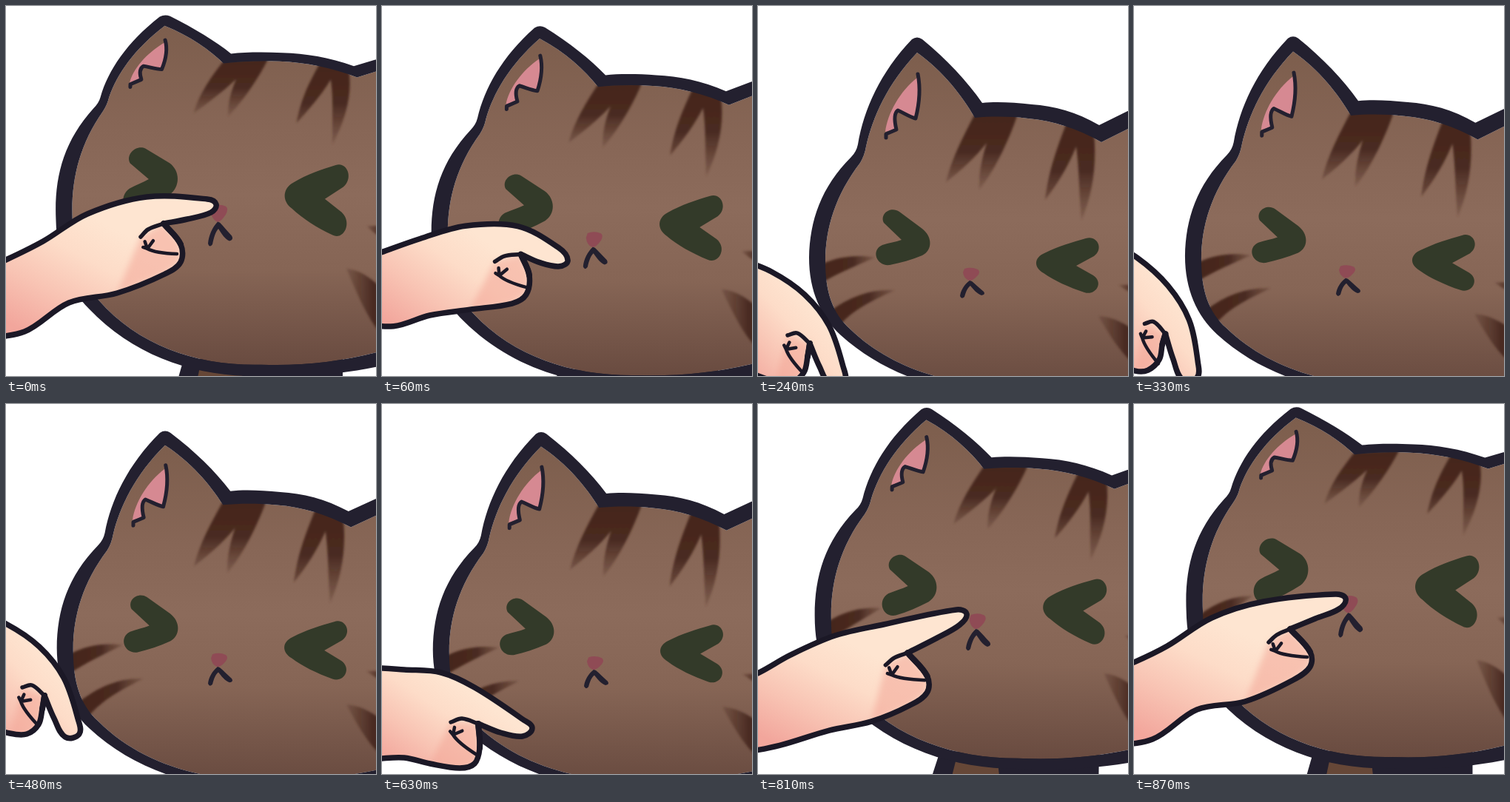
Write an HTML page that moves like this. It is 500 by 500 pixels and loops after 0.9 s.

```html
<!DOCTYPE html>
<html lang="en">
<head>
<meta charset="utf-8">
<title>Cat nose poke</title>
<style>
html, body { margin: 0; width: 100%; height: 100%; overflow: hidden; background: #fff; }
svg { display: block; width: 100vw; height: 100vh; }
</style>
</head>
<body>
<svg viewBox="0 0 500 500" xmlns="http://www.w3.org/2000/svg">
  <defs>
    <linearGradient id="fur" x1="0" y1="0" x2="0" y2="1">
      <stop offset="0" stop-color="#7d5e4d"/>
      <stop offset=".3" stop-color="#876656"/>
      <stop offset=".5" stop-color="#8c6b5b"/>
      <stop offset=".72" stop-color="#866555"/>
      <stop offset="1" stop-color="#694b40"/>
    </linearGradient>
    <linearGradient id="down" x1="0" y1="0" x2="0" y2="1">
      <stop offset="0" stop-color="#44251c"/>
      <stop offset=".5" stop-color="#4a2a20"/>
      <stop offset="1" stop-color="#5a392d" stop-opacity=".25"/>
    </linearGradient>
    <linearGradient id="right">
      <stop offset="0" stop-color="#44251c"/>
      <stop offset=".6" stop-color="#4a2a20"/>
      <stop offset="1" stop-color="#5a392d" stop-opacity=".35"/>
    </linearGradient>
    <linearGradient id="left" x1="1" x2="0">
      <stop offset="0" stop-color="#44251c"/>
      <stop offset=".4" stop-color="#4a2a20"/>
      <stop offset="1" stop-color="#5a392d" stop-opacity=".35"/>
    </linearGradient>
    <linearGradient id="skin" gradientUnits="userSpaceOnUse">
      <stop offset="0" stop-color="#fee5d1"/>
      <stop offset=".3" stop-color="#fddcc8"/>
      <stop offset=".65" stop-color="#f8c3b3"/>
      <stop offset="1" stop-color="#f2a69c"/>
    </linearGradient>
    <filter id="soft" x="-20%" y="-20%" width="140%" height="140%"><feGaussianBlur stdDeviation="1.6"/></filter>
    <filter id="softer" x="-30%" y="-30%" width="160%" height="160%"><feGaussianBlur stdDeviation="4"/></filter>
    <clipPath id="handClip"><path id="clipShape"/></clipPath>
  </defs>
  <rect width="500" height="500" fill="#fff"/>
  <g id="cat"></g>
  <g stroke="#1b1826" stroke-linecap="round" stroke-linejoin="round" fill="none">
    <path id="hand" fill="url(#skin)" stroke="none"/>
    <g clip-path="url(#handClip)" stroke="none"><path id="blush" fill="#f3a698" fill-opacity=".55" filter="url(#softer)"/></g>
    <path id="handLine" stroke-width="7.5"/>
    <path id="fist" stroke-width="8"/>
    <path id="crease" stroke-width="5.5"/>
    <path id="mark" stroke-width="4.5"/>
  </g>
</svg>
<script>
const $ = id => document.getElementById(id);
const LOOP = 900, STEP = 30, INK = '#23202f';

// ---- cat: paths in the lowered head pose, bent by the head pitch ----
const OUTER = 'M560 112L461 161C430 143 400 135 370 133C345 130 320 129 303 131C283 102 255 72 222 45' +
  'Q215 40 208 45C165 90 143 140 135 187Q133 197 126 204C85 245 70 290 69 340C69 385 85 420 112 445' +
  'C175 502 260 526 345 526C420 528 480 522 560 505Z';
const INNER = 'M560 136L464 184C432 166 400 155 365 152C340 149 315 149 293 151C275 120 250 88 215 63' +
  'C175 105 155 150 146 190Q144 202 138 212C105 255 91 300 91 345C91 385 100 415 125 437' +
  'C180 490 260 514 345 514C420 516 480 508 560 488Z';
const EAR = 'Q182 146 189 141C198 145 205 150 213 152C218 132 220 112 ';

const parts = [
  ['M240 506L226 545L455 545L455 506Z', INK],
  ['M262 515L254 545L322 545L318 515Z', '#664737'],
  [INNER, 'url(#fur)'],
  // forehead stripes
  ['M293 146C278 175 262 205 254 238C275 222 295 203 309 185C303 205 298 225 299 248C318 225 338 185 351 146Z', 'url(#down)', 'soft'],
  ['M418 155C405 190 393 220 388 262C405 240 420 215 430 190C434 220 434 255 437 290C452 255 458 215 454 172Z', 'url(#down)', 'soft'],
  // cheek stripes
  ['M86 349C110 338 135 336 158 340C135 350 110 360 88 373Z', 'url(#right)', 'soft'],
  ['M98 412C125 392 155 382 185 384C160 396 130 408 110 432Z', 'url(#right)', 'soft'],
  ['M487 377Q500 376 520 378L520 394Q500 387 487 377Z', 'url(#left)', 'soft'],
  ['M460 419C480 420 500 430 520 448L520 492C495 477 480 453 460 419Z', 'url(#left)', 'soft'],
  // ear
  ['M215 97C192 115 175 145 172 170L186 166' + EAR + '215 97Z', '#d68992'],
  ['M173 178L173 173Q180 170 187 167' + EAR + '216 92', 'none', '', 5],
  // eyes
  ['M170 293C164 280 180 270 191 278L222 301C236 312 236 330 222 337C207 343 193 347 178 350' +
   'C160 352 152 330 168 323C177 320 186 319 194 316Z', '#333a29'],
  ['M443 314C458 309 468 328 454 338L430 351L453 364C468 374 456 392 441 387C420 380 400 371 386 361' +
   'C372 353 373 340 387 334C405 325 425 319 443 314Z', '#333a29'],
  // nose and mouth
  ['M279 355Q288 352 297 356Q301 359 297 364Q290 372 285 371Q278 368 277 360Z', '#8f4b55'],
  ['M286 371C279 376 274 384 273 392Q275 397 279 393C281 386 283 381 287 378C291 383 296 389 302 391' +
   'Q308 390 305 386C299 381 294 376 289 372Z', INK],
  [OUTER + INNER, INK]
].map(([d, fill, blur, line]) => {
  const el = document.createElementNS('http://www.w3.org/2000/svg', 'path');
  el.setAttribute('fill', fill);
  el.setAttribute('fill-rule', 'evenodd');
  if (blur) el.setAttribute('filter', `url(#${blur})`);
  if (line) {
    el.setAttribute('stroke', INK);
    el.setAttribute('stroke-width', line);
    el.setAttribute('stroke-linecap', 'round');
    el.setAttribute('stroke-linejoin', 'round');
  }
  $('cat').append(el);
  return { el, d };
});

const bell = (v, mid, width) => Math.exp(-(((v - mid) / width) ** 2));

function bend(d, pitch) {
  return d.replace(/(\d+) (\d+)/g, (_, a, b) => {
    const x = +a, y = +b;
    const dome = 1 - 0.3 * ((Math.min(x, 480) - 400) / 270) ** 2;
    const nx = x + pitch * (x - 270) * 0.055 * bell(y, 200, 100);
    const ny = y - pitch * 104 * dome * bell(y, 270, 218);
    return nx.toFixed(2) + ' ' + ny.toFixed(2);
  });
}

// ---- hand poses: 17 outline points, then crease end, crease middle, mark start, mark end ----
const touch = [-40,360, 0,343, 50,318, 110,281, 190,258, 272,261, 284,268, 277,279, 245,288, 213,294, 236,322,
  236,346, 215,362, 150,388, 85,401, 25,440, -40,450, 182,312, 192,302, 191,328, 231,335];
const press = [-40,364, 0,349, 45,327, 105,289, 175,267, 272,257, 286,263, 277,277, 245,290, 211,304, 238,335,
  238,355, 215,373, 150,402, 85,413, 25,453, -40,462, 182,322, 193,312, 191,334, 234,342];
const reach = [-40,390, 0,372, 45,347, 105,337, 170,333, 255,320, 267,327, 258,340, 228,357, 186,373, 206,403,
  205,430, 183,444, 145,453, 100,465, 30,462, -40,480, 153,386, 165,377, 160,404, 203,412];
const swing = [-60,357, -20,356, 30,359, 80,363, 125,383, 190,426, 203,438, 190,449, 160,444, 130,432, 132,465,
  125,486, 105,492, 65,486, 30,478, 0,479, -60,485, 93,430, 108,425, 96,447, 128,474];
const leave = [-60,340, -10,330, 45,323, 105,331, 155,361, 190,410, 203,437, 185,444, 165,425, 146,400, 147,430,
  138,455, 120,464, 75,455, 35,454, 0,441, -60,420, 109,399, 125,395, 111,418, 143,445];
const rest = [-90,270, -45,280, 0,297, 45,328, 78,370, 97,425, 99,446, 80,450, 65,425, 52,394, 49,412,
  44,433, 28,446, 5,445, -25,435, -55,420, -90,410, 22,383, 35,380, 20,402, 44,435];
const low = rest.map((v, i) => v + (i % 2 ? 62 : 18));

// time, head [pitch, x, y, tilt], hand
const keys = [
  [0,   [1, 0, 0, 0], touch],
  [120, [.15, 0, 0, 0], leave],
  [240, [0, 0, 0, 0], low],
  [480, [.2, 0, 0, 0], rest],
  [630, [.15, 0, 0, 0], swing],
  [750, [.12, 9.5, -21.5, 1.3], reach],
  [870, [1.03, 3, -7, .2], press]
].map(([t, head, hand]) => ({ t, v: head.concat(hand) }));

function key(i) {
  const n = keys.length, k = keys[(i + n) % n];
  return { t: k.t + Math.floor(i / n) * LOOP, v: k.v };
}

// smooth periodic curve through the keys
function pose(t) {
  let i = keys.length - 1;
  while (keys[i].t > t) i--;
  const [a, b, c, d] = [i - 1, i, i + 1, i + 2].map(key);
  const h = c.t - b.t, h0 = b.t - a.t, h1 = d.t - c.t, u = (t - b.t) / h;
  return b.v.map((p, j) => {
    const q = c.v[j], s = (q - p) / h;
    const s0 = (p - a.v[j]) / h0, s1 = (d.v[j] - q) / h1;
    const m = (s0 * h + s * h0) / (h + h0), n = (s * h1 + s1 * h) / (h + h1);
    const w = u * u * (3 - 2 * u);
    return p + (q - p) * w + h * (m * u * (1 - u) ** 2 - n * u * u * (1 - u));
  });
}

const xy = p => p[0].toFixed(2) + ' ' + p[1].toFixed(2);

function curve(pts) {
  const last = pts.length - 1;
  const tangent = i => {
    const a = pts[Math.max(i - 1, 0)], b = pts[Math.min(i + 1, last)];
    const x = b[0] - a[0], y = b[1] - a[1], len = Math.hypot(x, y) || 1;
    return [x / len, y / len];
  };
  let d = '';
  for (let i = 0; i < last; i++) {
    const p = pts[i], q = pts[i + 1], m = tangent(i), n = tangent(i + 1);
    const r = Math.hypot(q[0] - p[0], q[1] - p[1]) / 3;
    d += 'C' + xy([p[0] + m[0] * r, p[1] + m[1] * r]) + ' ' +
      xy([q[0] - n[0] * r, q[1] - n[1] * r]) + ' ' + xy(q);
  }
  return d;
}

function drawCat([pitch, x, y, tilt]) {
  for (const { el, d } of parts) el.setAttribute('d', bend(d, pitch));
  $('cat').setAttribute('transform', `translate(${x} ${y}) rotate(${tilt} 288 361)`);
}

function drawHand(v) {
  const pts = [];
  for (let i = 0; i < v.length; i += 2) pts.push([v[i], v[i + 1]]);
  const base = pts[9], [end, mid, from, to] = pts.slice(17);
  const outline = 'M' + xy(pts[0]) + curve(pts.slice(0, 10)) + curve(pts.slice(9, 17));
  $('hand').setAttribute('d', outline + 'Z');
  $('clipShape').setAttribute('d', outline + 'Z');
  $('handLine').setAttribute('d', outline);
  $('fist').setAttribute('d', 'M' + xy(base) + curve(pts.slice(9, 12)).split('C').slice(0, 2).join('C'));
  $('crease').setAttribute('d', 'M' + xy(base) + curve([base, mid, end]));
  $('blush').setAttribute('d', 'M' + [end, base, pts[10], pts[11], pts[12], pts[13]].map(xy).join('L') + 'Z');

  const a = Math.atan2(to[1] - from[1], to[0] - from[0]), c = Math.cos(a), s = Math.sin(a);
  const near = (x, y) => xy([from[0] + x * c - y * s, from[1] + x * s + y * c]);
  $('mark').setAttribute('d', `M${near(-5, -9)}L${xy(from)}L${near(6, -12)}M${near(-6, -1)}L${xy(from)}Q${near(12, 4)} ${xy(to)}`);

  const g = $('skin');
  [['x1', pts[3][0]], ['y1', pts[3][1]], ['x2', pts[15][0]], ['y2', pts[15][1]]]
    .forEach(([k, n]) => g.setAttribute(k, n));
}

function draw(ms) {
  const v = pose(Math.floor((ms % LOOP) / STEP) * STEP);
  drawCat(v);
  drawHand(v.slice(4));
}

const start = performance.now();
function tick() {
  draw(performance.now() - start);
  requestAnimationFrame(tick);
}
tick();
</script>
</body>
</html>
```
